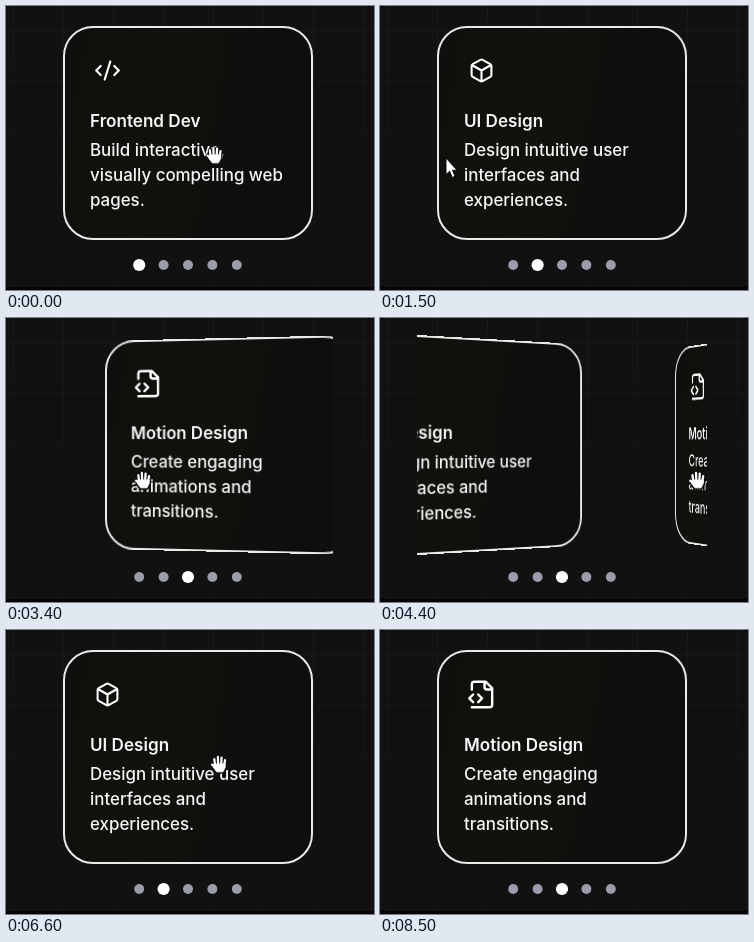
An HTML page for the animation above (8800 ms loop, 368 px wide and 284 px high).

```html
<!DOCTYPE html>
<html lang="en">
<head>
<meta charset="utf-8">
<title>Card carousel</title>
<style>
  html, body { margin: 0; width: 100%; height: 100%; overflow: hidden; background: #111; }
  #stage { position: relative; width: 368px; height: 284px; overflow: hidden; background: #111; }
  #stage > svg { position: absolute; left: 0; top: 0; }
  #view { position: absolute; left: 37px; top: 0; width: 290px; height: 250px; overflow: hidden; perspective: 1000px; }
  .card {
    position: absolute; left: 20px; top: 20px; width: 250px; height: 214px;
    box-sizing: border-box; border: 2px solid #e9e9e9; border-radius: 30px;
    background: linear-gradient(100deg, #0e100d, #10120d 40%, #0d0f0d 75%);
    color: #f6f6f6; font: 500 16.9px/25px Inter, sans-serif; white-space: nowrap;
  }
  .card svg { position: absolute; left: 0; top: 0; overflow: visible; }
  .card b, .card p { position: absolute; left: 25px; margin: 0; }
  .card b { top: 79.5px; font-weight: 600; font-size: 17.1px; }
  .card p { top: 109.5px; white-space: pre; }
</style>
</head>
<body>
<div id="stage">
  <svg width="368" height="284">
    <defs>
      <linearGradient id="fade" x1="0" y1="0" x2="0" y2="284" gradientUnits="userSpaceOnUse">
        <stop offset="0" stop-color="#191919"/>
        <stop offset="1" stop-color="#111"/>
      </linearGradient>
    </defs>
    <path id="grid" fill="none" stroke="url(#fade)"/>
    <rect y="281" width="368" height="3" fill="#070305"/>
  </svg>
  <div id="view"></div>
  <svg width="368" height="284">
    <g id="dots"></g>
    <g id="hand" stroke-linecap="round" stroke-linejoin="round">
      <g fill="#111" stroke="#111" stroke-width="3.4">
        <path d="M-4 0H5.5V3L3.5 7H-2L-5 3Z"/>
        <path d="M-3.5 1L-4.2-4.3M-.8 0L-1-6.3M2 0L2.3-5.8M4.6 1L5.4-3.4M-3 3L-6.2 .6"/>
      </g>
      <path d="M-4 0H5.5V3L3.5 7H-2L-5 3Z" fill="#fff" stroke="#fff" stroke-width=".8"/>
      <path d="M-3.5 1L-4.2-4.3M-.8 0L-1-6.3M2 0L2.3-5.8M4.6 1L5.4-3.4M-3 3L-6.2 .6" stroke="#fff" stroke-width="2"/>
    </g>
    <path id="arrow" d="M-5-10V6.5L-1.3 3.2L1.2 9.5L4 8.3L1.5 2.2H6Z" fill="#fff" stroke="#111"/>
  </svg>
</div>
<script>
const LOOP = 8800, PITCH = 272, MID = 182;
const $ = id => document.getElementById(id);

const cards = [
  { title: 'Frontend Dev', text: 'Build interactive,\nvisually compelling web\npages.', size: 1.13,
    icon: 'm18 16 4-4-4-4M6 8l-4 4 4 4M14.5 4l-5 16', cx: 12 },
  { title: 'UI Design', text: 'Design intuitive user\ninterfaces and\nexperiences.', size: 1.1,
    icon: 'M21 8a2 2 0 0 0-1-1.73l-7-4a2 2 0 0 0-2 0l-7 4A2 2 0 0 0 3 8v8a2 2 0 0 0 1 1.73l7 4a2 2 0 0 0 2 0l7-4A2 2 0 0 0 21 16ZM3.3 7 12 12l8.7-5M12 22V12', cx: 12 },
  { title: 'Motion Design', text: 'Create engaging\nanimations and\ntransitions.', size: 1.27,
    icon: 'M4 22h14a2 2 0 0 0 2-2V7l-5-5H6a2 2 0 0 0-2 2v4M14 2v4a2 2 0 0 0 2 2h4M5 12l-3 3 3 3M9 18l3-3-3-3', cx: 11.6 }
];

// drag points [ms, position], then a spring to the card index
const drags = [
  { pts: [[880, 0], [1100, .52]], to: 1 },
  { pts: [[2880, 1], [3250, 1.29]], to: 2 },
  { pts: [[3880, 2], [4400, 1.336], [4600, 1.22], [5000, .75], [5300, .493], [5340, .493]], to: 1 },
  { pts: [[6780, 1], [7080, 1.5]], to: 2 }
];

// pointer keys [ms, x, y, shape]
const pointer = [
  [0, 208.5, 149, 'hand'], [200, 208.5, 149, 'hand'], [400, 207, 172, 'hand'], [880, 207, 172, 'hand'],
  [1100, 71, 162, 'hand'], [1400, 71, 162, 'arrow'], [1800, 71, 162, 'arrow'], [2480, 140, 162, 'arrow'],
  [2600, 140, 162, 'hand'], [2690, 215, 174, 'hand'], [2880, 215, 174, 'hand'], [3250, 137, 162, 'hand'],
  [3880, 137, 162, 'hand'], [4400, 317, 162, 'hand'], [4600, 349, 162, 'hand'], [4680, 380, 162, ''],
  [5700, 350, 146, 'hand'], [6400, 213, 134, 'hand'], [6780, 213, 134, 'hand'], [7080, 77, 150, 'hand'],
  [7300, 77, 150, '']
];

let lines = '';
for (let i = 0; i < 8; i++) lines += `M${7.5 + 50 * i} 0V281`;
for (let i = 0; i < 5; i++) lines += `M0 ${24.5 + 50 * i}H368`;
$('grid').setAttribute('d', lines);

$('view').innerHTML = cards.map(c => `<div class="card"><svg width="1" height="1">
  <path d="${c.icon}" transform="translate(42.5 42.5) scale(${c.size}) translate(${-c.cx} -12)"
  fill="none" stroke="#fff" stroke-width="1.9" stroke-linecap="round" stroke-linejoin="round"/></svg>
  <b>${c.title}</b><p>${c.text}</p></div>`).join('');
const els = [...document.querySelectorAll('.card')];

$('dots').innerHTML = [-2, -1, 0, 1, 2].map(i => `<circle cx="${MID + 24.4 * i}" cy="259"/>`).join('');
const dots = [...$('dots').children];

const clamp = v => Math.max(0, Math.min(1, v));
const mix = (a, b, k) => a + (b - a) * k;

function along(keys, t) {
  let i = keys.length - 1;
  while (i > 0 && keys[i][0] > t) i--;
  const a = keys[i], b = keys[i + 1] || a;
  const k = a === b ? 0 : clamp((t - a[0]) / (b[0] - a[0]));
  return a.map((v, n) => typeof v === 'number' ? mix(v, b[n], k) : v);
}

function spring(ms) {
  const s = ms / 1000;
  return s > .38 ? 0 : Math.exp(-15 * s) * (Math.cos(8.66 * s) + 1.732 * Math.sin(8.66 * s));
}

function carousel(t) {
  let state = { pos: 0, index: 0, prev: 0, since: 1e4 };
  for (const d of drags) {
    const [end, last] = d.pts[d.pts.length - 1];
    if (t < d.pts[0][0]) break;
    if (t < end) return { ...state, pos: along(d.pts, t)[1] };
    state = { pos: d.to + (last - d.to) * spring(t - end), index: d.to, prev: state.index, since: t - end };
  }
  return state;
}

function draw(t) {
  const { pos, index, prev, since } = carousel(t);
  const eye = MID + (index - pos) * PITCH - 56 * index;
  $('view').style.perspectiveOrigin = `${eye - 37}px 127px`;
  els.forEach((el, i) => {
    const off = i - pos;
    el.style.visibility = Math.abs(off) < .99 ? 'visible' : 'hidden';
    el.style.transform = Math.abs(off) < .001 ? 'none'
      : `translateX(${off * PITCH}px) rotateY(${-90 * off}deg)`;
  });

  const k = clamp(since / 150);
  dots.forEach((dot, i) => {
    const on = i === index ? k : i === prev ? 1 - k : 0;
    dot.setAttribute('r', mix(5, 6.1, on));
    dot.setAttribute('fill', `rgb(${mix(154, 255, on)},${mix(156, 255, on)},${mix(172, 255, on)})`);
  });

  const [, x, y, shape] = along(pointer, t);
  for (const [id, size] of [['hand', 1.12], ['arrow', 1]]) {
    $(id).setAttribute('visibility', id === shape ? 'visible' : 'hidden');
    $(id).setAttribute('transform', `translate(${x} ${y}) scale(${size})`);
  }
}

const start = performance.now();
function tick() {
  draw((performance.now() - start) % LOOP);
  requestAnimationFrame(tick);
}
tick();
</script>
</body>
</html>
```
